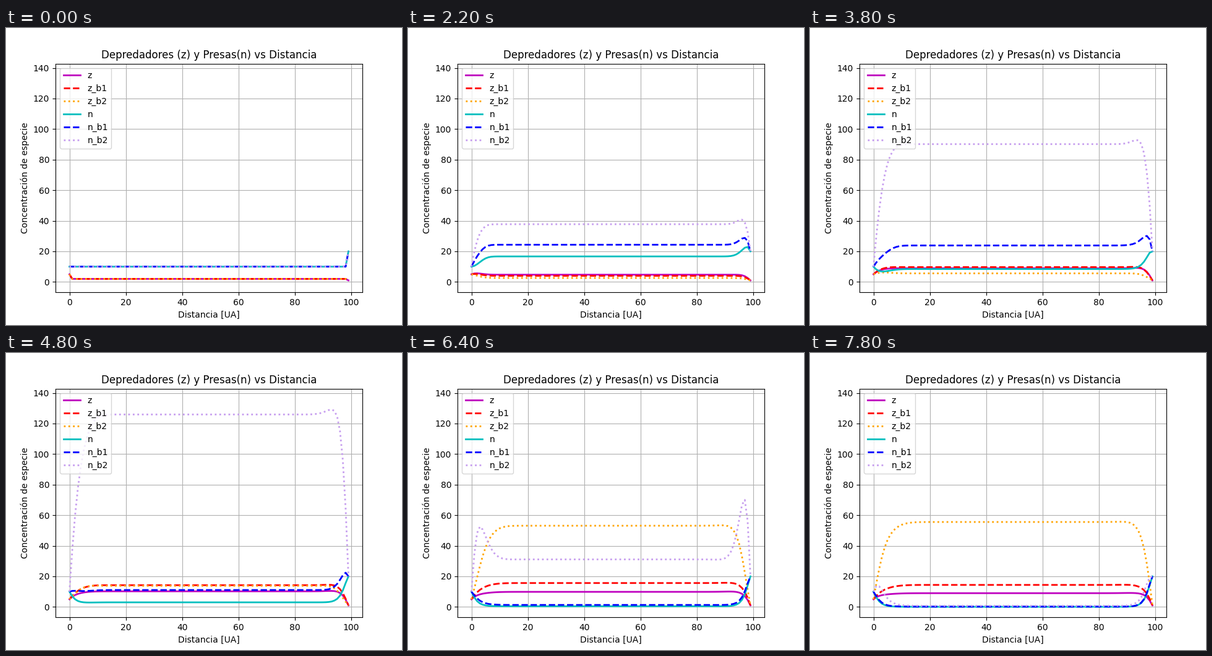
Animation, 640 px wide and 480 px high, one loop 8 s. Source, as a matplotlib script:

```python
import numpy as np
import matplotlib.pyplot as plt
from matplotlib.animation import FuncAnimation

STEPS = 40
INTERVAL = 200
CELLS = 100

GROWTH = 0.15
DEATH = 0.015
YIELD = 0.2
DIFFUSION = 0.4
PREDATION = [0.035, 0.025, 0.01]


def laplacian(u):
    return u[:-2] - 2 * u[1:-1] + u[2:]


def simulate(rate):
    """Predator-prey reaction with diffusion and fixed ends."""
    z = np.full((STEPS, CELLS), 2.0)
    n = np.full((STEPS, CELLS), 10.0)
    z[:, 0], z[:, -1] = 5, 1
    n[:, 0], n[:, -1] = 10, 20
    for k in range(STEPS - 1):
        zi, ni = z[k, 1:-1], n[k, 1:-1]
        eaten = rate * zi * ni
        z[k + 1, 1:-1] = zi + YIELD * eaten - DEATH * zi + DIFFUSION * laplacian(z[k])
        n[k + 1, 1:-1] = ni + GROWTH * ni - eaten + DIFFUSION * laplacian(n[k])
    return z, n


predators, prey = zip(*(simulate(rate) for rate in PREDATION))
series = predators + prey
styles = [
    ("z", "m", "-"),
    ("z_b1", "r", "--"),
    ("z_b2", "orange", ":"),
    ("n", "c", "-"),
    ("n_b1", "b", "--"),
    ("n_b2", "xkcd:lavender", ":"),
]

fig, ax = plt.subplots(figsize=(6.4, 4.8), dpi=100)
x = np.arange(CELLS)
lines = [
    ax.plot(x, data[0], color=color, linestyle=dash, linewidth=2, label=name)[0]
    for data, (name, color, dash) in zip(series, styles)
]
ax.set_ylim(-6.8, 142.8)
ax.set_title("Depredadores (z) y Presas(n) vs Distancia")
ax.set_xlabel("Distancia [UA]")
ax.set_ylabel("Concentración de especie")
ax.grid()
ax.legend(loc="upper left")


def update(k):
    for line, data in zip(lines, series):
        line.set_ydata(data[k])
    return lines


anim = FuncAnimation(fig, update, frames=STEPS, interval=INTERVAL, repeat=True)
plt.show()
```
